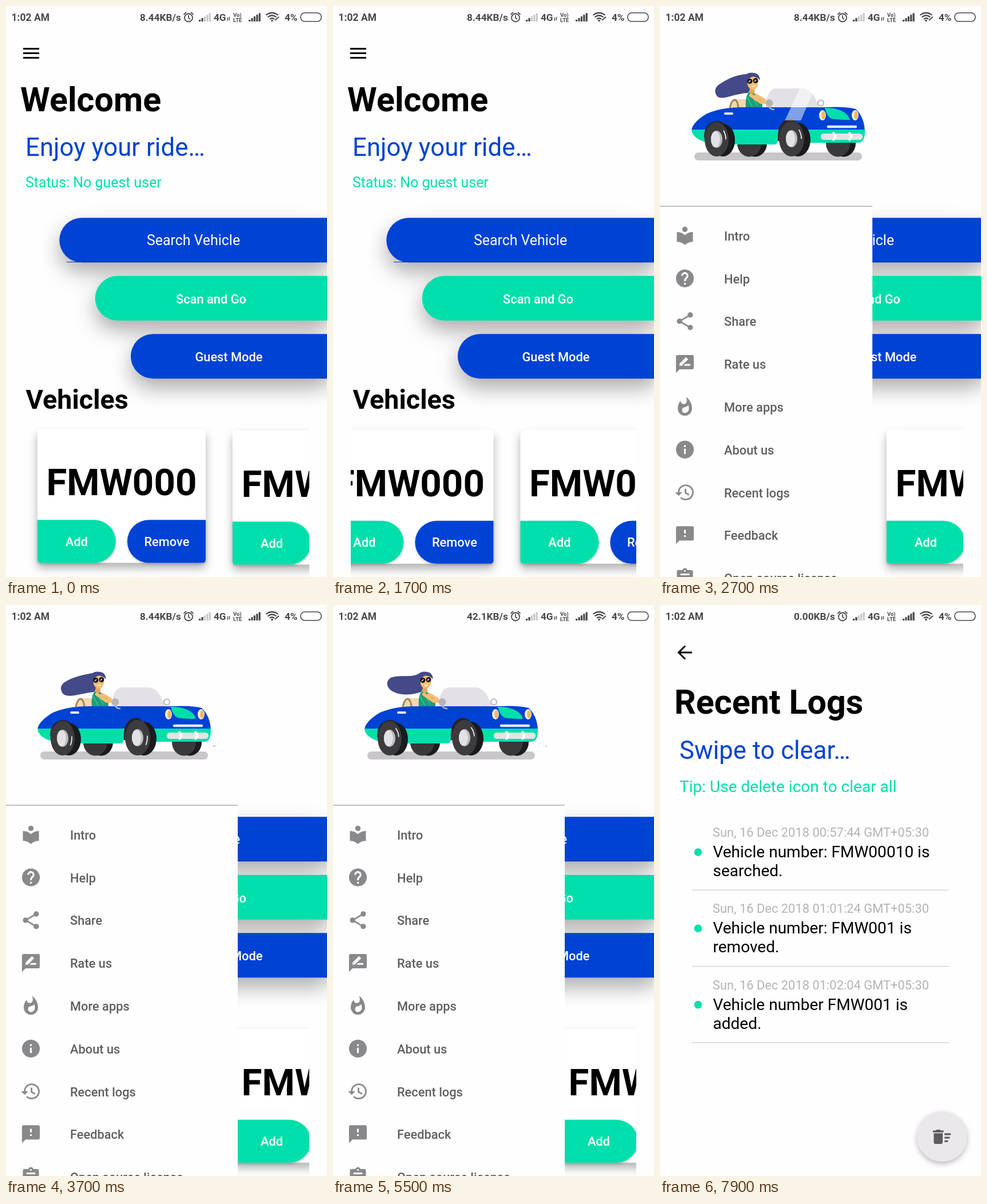
Write an HTML page that moves like this. It is 561 px wide and 998 px high and loops after 8000 ms.

```html
<!DOCTYPE html>
<html lang="en">
<head>
<meta charset="utf-8">
<title>Ride app</title>
<style>
html, body { margin: 0; width: 100%; height: 100%; overflow: hidden; background: #fefefe; }
svg { display: block; width: 100vw; height: 100vh; font-family: Roboto, sans-serif; }
text { white-space: pre; }
.card { filter: drop-shadow(0 9px 8px rgba(0,0,0,.3)); }
.chip { filter: drop-shadow(0 2px 2px rgba(0,0,0,.2)); }
.fab { filter: drop-shadow(0 4px 5px rgba(0,0,0,.26)); }
</style>
</head>
<body>
<svg id="stage" viewBox="0 0 561 998"></svg>
<script>
const BLUE = '#0042d4', GREEN = '#00dfab', GREY = '#89888b', PAPER = '#fefefe';
const LOOP = 8000;

const text = (x, y, size, str, fill = '#000', weight = 400, anchor = 'start', id = '') =>
  `<text x="${x}" y="${y}" font-size="${size}" fill="${fill}" font-weight="${weight}" text-anchor="${anchor}" id="${id}">${str}</text>`;
const path = (d, fill, extra = '') => `<path d="${d}" fill="${fill}" ${extra}/>`;
const line = (d, stroke, width, extra = '') =>
  `<path d="${d}" fill="none" stroke="${stroke}" stroke-width="${width}" ${extra}/>`;
const oval = (x, y, rx, ry, fill, extra = '') =>
  `<ellipse cx="${x}" cy="${y}" rx="${rx}" ry="${ry}" fill="${fill}" ${extra}/>`;
const disc = (x, y, r, fill, extra = '') => oval(x, y, r, r, fill, extra);
const box = (x, y, w, h, r, fill, extra = '') =>
  `<rect x="${x}" y="${y}" width="${w}" height="${h}" rx="${r}" fill="${fill}" ${extra}/>`;
// 24-unit icon centred on a point
const icon = (x, y, body) =>
  `<g transform="translate(${x} ${y}) scale(1.558) translate(-12 -12)">${body}</g>`;

function statusBar() {
  const ink = '#48484a';
  const bars = (x, solid) => [0, 1, 2, 3, 4].map(i =>
    box(x + i * 4.4, 24 - i * 2.9, 3.2, 3 + i * 2.9, 0, i < solid ? ink : '#c9c9cb')).join('');
  return text(9.5, 26, 17.5, '1:02 AM', ink, 700) +
    text(234, 26, 17.2, '', ink, 700, 'start', 'speed') +
    disc(319, 20.5, 7, 'none', `stroke="${ink}" stroke-width="1.8"`) +
    line('M319 16v5l3 2M310.5 15l4.5-4M327.5 15l-4.5-4', ink, 1.7) +
    bars(337, 2) + text(363, 26, 17.2, '4G', ink, 700) +
    line('M387.5 20v6M390.5 19v6', ink, 1.4) +
    text(397, 18.5, 9.5, 'Vo)', ink, 700) + text(397, 27.5, 9.5, 'LTE', ink, 700) +
    bars(424, 5) +
    line('M454.5 16Q465 8 475.5 16M457.5 19.5Q465 13.5 472.5 19.5M461 23Q465 19.5 469 23', ink, 2.2) +
    disc(465, 25.5, 1.8, ink) + line('M470 25l7-6', ink, 2) +
    text(487, 26, 17.2, '4%', ink, 700) +
    box(515, 12, 36, 15, 7, 'none', `stroke="${ink}" stroke-width="1.6"`);
}

function pills() {
  const rows = [[93.3, 370.3, BLUE], [155.7, 471.8, GREEN], [218, 573.2, BLUE]];
  const shadow = rows.map(([x, y]) => box(x, y + 17, 575 - x, 78, 39, '#000', 'opacity=".32"'));
  const face = rows.map(([x, y, c]) => box(x, y, 640 - x, 78, 39, c));
  return `<g filter="url(#soft)">${shadow.join('')}</g>` + face.join('') +
    line('M106 447.5H549', '#15328a', 1) +
    text(327.5, 417.6, 24.9, 'Search Vehicle', '#fff', 400, 'middle') +
    text(358.5, 519.5, 21.8, 'Scan and Go', '#fff', 500, 'middle') +
    text(389.5, 621, 21.8, 'Guest Mode', '#fff', 500, 'middle');
}

const card = (id, plate) => `<g id="${id}"><g class="card">${box(0, 0, 294, 234.4, 6, '#fff')}</g>
  ${path('M0 159.4H99.5A37.5 37.5 0 0 1 99.5 234.4H6Q0 234.4 0 228.4z', GREEN, 'class="chip"')}
  ${path('M294 159.4H194.5A37.5 37.5 0 0 0 194.5 234.4H288Q294 234.4 294 228.4z', BLUE, 'class="chip"')}
  ${text(147, 116.4, 65.4, plate, '#000', 700, 'middle')}
  ${text(68.5, 204.9, 21.8, 'Add', '#fff', 500, 'middle')}
  ${text(226, 204.9, 21.8, 'Remove', '#fff', 500, 'middle')}</g>`;

const home = () => line('M30 74.8h28M30 82.6h28M30 90.4h28', '#000', 3) +
  text(25, 183.5, 59.2, 'Welcome', '#000', 700) +
  text(34, 262, 43.8, 'Enjoy your ride…', BLUE) +
  text(34, 317, 24.9, 'Status: No guest user', GREEN) + pills() +
  text(34.5, 704, 46.7, 'Vehicles', '#000', 700) +
  `<g clip-path="url(#rail)">${card('card0', 'FMW000')}${card('card1', 'FMW001')}</g>`;

function car() {
  const wheel = (x, y, rx, ry) => oval(x + 11, y + 1.5, rx, ry - 1.5, '#1b1a1c') +
    oval(x, y, rx, ry, '#3c3b3e') + oval(x, y, 10, 15, '#bcbabd') + oval(x - 2, y, 8, 14, '#e3e1e5') +
    `<ellipse class="spin" cx="${x}" cy="${y}" rx="${rx - 5}" ry="${ry - 7}" fill="none" stroke="#fff" stroke-width="1.6" pathLength="100" stroke-dasharray="13 87"/>`;
  const farWheel = x => oval(x + 5, 240, 21, 23.5, '#1b1a1c') + oval(x - 5, 240, 21, 23.5, '#39383b');
  const lamp = x => oval(x, 191, 6, 9, '#f4f1f1') + oval(x + 1.5, 191, 3.5, 7, '#f6b95f');
  return box(60, 256, 293, 14, 7, '#c8c6c9') + farWheel(161) + farWheel(316) +
    // seat, driver
    path('M121 178Q123 163 131 163H150Q160 166 162 178z', '#f1d9ae') +
    line('M122 178Q125 164 131 164Q136 166 137 178', '#a5835b', 3) +
    path('', '#434a87', 'id="hair"') +
    path('M150 178Q148 157 157 149L170 155Q180 163 179 178z', '#1d9c78') +
    line('M153 160l8 16M160 156l10 18M167 156l8 14', '#2ccfa0', 1.5) +
    path('M157 143h8v9q-5 3-9-1z', '#eda656') + oval(162, 134, 9.5, 12, '#fbbd72') +
    path('M150 131Q152 117 165 117Q175 119 174.5 130Q168 122 160 124Q152 127 153 141z', '#434a87') +
    disc(157, 131.5, 4.5, '#151515') + disc(167, 130.5, 4.5, '#151515') +
    line('M155 133l3-3M165 132l3-3', '#fff', 1.4) + line('M160 140q3 2 6-1', '#fff', 1.6) +
    line('M159 156L176 168L187 168', '#fbbd72', 6, 'stroke-linejoin="round" stroke-linecap="round"') +
    line('M168 156l14 8', '#fbbd72', 5, 'stroke-linecap="round"') +
    path('M184 178Q187 144 203 144H250Q268 146 278 178z', '#e3e1e5') +
    disc(281, 169.5, 5, 'none', 'stroke="#c3c1c5" stroke-width="2.5"') +
    // bodywork
    path('M55 217Q57 203 82 188Q108 177 144 177H287Q325 175 342 180Q357 194 358 219z', BLUE) +
    path('M55 216H358Q359 239 346 239H262Q249 239 245 230L206 236Q205 242 199 242H104L77 237Q56 230 55 216z', GREEN) +
    path('M288 178Q325 178 332 199Q313 199 300 197Q292 194 288 178z', GREEN) +
    lamp(284) + lamp(341) + line('M294 211H342', '#e3e8f2', 4.5, 'stroke-linecap="round"') +
    box(281, 223, 73, 11, 5, '#e5e3e7') +
    line('M302 221q8 7 0 14M330 221q8 7 0 14', '#fff', 4) +
    line('M114 188H126', '#f2f2f6', 4, 'stroke-linecap="round"') +
    path('M77 228Q78 203 100 201Q123 203 126 240H80z', '#252427') +
    path('M206 236Q204 199 228 197Q246 200 248 236z', '#252427') +
    wheel(99, 233, 21, 30) + wheel(230, 232, 22, 31) +
    disc(191, 169.5, 6.5, '#b5b3b7') + line('M191 174q0 7 9 7', '#b5b3b7', 2.5) +
    `<g clip-path="url(#glass)">${path('M22 144H48L24 200H-4z', '#fff', 'opacity=".5" id="shine"')}</g>` +
    path('M362 246h4v1h-4z', GREY, 'id="dash"') + path('M372 246h1.5v1.5h-1.5z', GREY, 'id="dot"');
}

const bubble = path('M4 2H20Q22 2 22 4V16Q22 18 20 18H6L2 22V4Q2 2 4 2z', GREY);
const ball = disc(12, 12, 10, GREY);
const menu = [
  ['Intro', disc(12, 5, 3, GREY) + path('M3 8Q8 8 12 11.5Q16 8 21 8V19Q16 19 12 22.5Q8 19 3 19z', GREY)],
  ['Help', ball + line('M9 9A3 3 0 1 1 14 11.2Q12 12.7 12 15.2', PAPER, 2) + box(11, 17, 2, 2, 0, PAPER)],
  ['Share', line('M18 5L6 12L18 19', GREY, 1.7) + disc(18, 5, 3, GREY) + disc(6, 12, 3, GREY) + disc(18, 19, 3, GREY)],
  ['Rate us', bubble + path('M6 14V11.5L13.2 4.3L15.7 6.8L8.5 14zM10.5 14L12.5 12H18V14z', PAPER)],
  ['More apps', path('M13.5 .7Q14.2 3.3 14.2 5.5A3.5 3.5 0 0 1 7.2 5.5V5.1A14 14 0 0 0 4 14A8 8 0 0 0 20 14Q20 6 13.5 .7z', GREY) +
    path('M11.7 19A3.2 3.2 0 0 1 11.3 12.7Q14.5 12 15.9 10.2Q16.5 12 16.5 14.2A4.8 4.8 0 0 1 11.7 19z', PAPER)],
  ['About us', ball + path('M11 7h2v2h-2zM11 11h2v6h-2z', PAPER)],
  ['Recent logs', line('M5 12A8 8 0 1 1 7.35 17.65M12.7 8V12.5L16.7 14.9', GREY, 1.8) + path('M1 12H9L5 16z', GREY)],
  ['Feedback', bubble + path('M11 6h2v4h-2zM11 12h2v2h-2z', PAPER)],
  ['Open source license', box(3, 3, 18, 18, 2, GREY) + disc(12, 4, 3, GREY) + disc(12, 4, 1, PAPER) + path('M7 7h10v2h-10z', PAPER)]
];

const drawer = () => box(0, 0, 405, 998, 0, PAPER) + car() + line('M0 350H405', '#858585', 1.2) +
  menu.map(([label, art], i) => icon(43.5, 401.3 + 74.8 * i, art) +
    text(112, 409.7 + 74.8 * i, 21.8, label, '#5f5f61', 500)).join('');

function logs() {
  const entries = [
    ['00:57:44', 'Vehicle number: FMW00010 is', 'searched.'],
    ['01:01:24', 'Vehicle number: FMW001 is', 'removed.'],
    ['01:02:04', 'Vehicle number FMW001 is', 'added.']
  ];
  return box(0, 0, 561, 998, 0, PAPER) + line('M56 83H33M44 71.5L32.5 83L44 94.5', '#000', 3) +
    text(25, 190, 59.2, 'Recent Logs', '#000', 700) +
    text(34, 269, 43.6, 'Swipe to clear…', BLUE) +
    text(34, 327, 28.04, 'Tip: Use delete icon to clear all', GREEN) +
    entries.map(([time, first, second], i) => `<g transform="translate(0 ${133.3 * i})">` +
      text(92, 405, 21.9, `Sun, 16 Dec 2018 ${time} GMT+05:30`, '#b4b4b4') +
      text(92.5, 441, 28.04, first) + text(92.5, 474, 28.04, second) +
      disc(66.5, 432, 6.8, GREEN) + line('M56 498.3H505', '#dcdcdc', 1.8) + '</g>').join('') +
    disc(493, 929, 44, '#ebe8eb', 'class="fab"') +
    icon(492.5, 929.5, path('M15 16h4v2h-4zM15 8h7v2h-7zM15 12h6v2h-6zM3 8H13V18Q13 20 11 20H5Q3 20 3 18zM14 5H11L10 4H6L5 5H2V7H14z', '#5c5b5e'));
}

const $ = id => document.getElementById(id);
$('stage').innerHTML = `<defs>
  <filter id="soft" x="-20%" y="-30%" width="140%" height="160%"><feGaussianBlur stdDeviation="18"/></filter>
  <clipPath id="rail">${box(31, 735, 499, 263, 0, '#000')}</clipPath>
  <clipPath id="reveal"><rect id="edge" y="40" height="958"/></clipPath>
  <clipPath id="glass">${path('M184 178Q187 144 203 144H250Q268 146 278 178V200H184z', '#000')}</clipPath>
</defs>
<g id="home">${home()}<g clip-path="url(#reveal)"><g id="drawer">${drawer()}</g></g></g>
<g id="logs">${logs()}</g>${statusBar()}`;

const clamp = v => Math.min(1, Math.max(0, v));
const easeOut = v => 1 - (1 - clamp(v)) ** 3;
const show = (id, on) => $(id).setAttribute('display', on ? 'inline' : 'none');
const move = (id, x, y = 0) => $(id).setAttribute('transform', `translate(${x} ${y})`);

function drawCar(t) {
  const run = Math.min(t, 4500);
  const k = (1 - Math.cos((run - 2700) / 1200 * 2 * Math.PI)) / 2;
  const mix = (a, b) => a + (b - a) * k;
  $('hair').setAttribute('d', `M172 122Q162 113 151 119C${mix(138, 140)} ${mix(120, 128)} ${mix(122, 118)} ${mix(124, 121)} ${mix(102, 101)} ${mix(138, 127)}` +
    `Q${mix(92, 90)} ${mix(147, 135)} ${mix(100, 98)} ${mix(158, 146)}C${mix(110, 108)} ${mix(166, 157)} ${mix(128, 130)} ${mix(153, 160)} 154 152z`);
  document.querySelectorAll('.spin').forEach(el => el.setAttribute('stroke-dashoffset', 15 - (run - 4500) * .11));
  const sweep = ((t + 100) % 800 - 400) / 400;
  show('shine', Math.abs(sweep) < .5);
  move('shine', 222 + sweep * 110);
  show('dash', t >= 3600 && t < 4500);
  show('dot', t >= 4500);
}

function draw(t) {
  const slide = t < 1800 ? -t * .0403 : -72.5 * (1 - easeOut((t - 1800) / 300));
  const settle = 1.5 * (1 - clamp(t / 300));
  move('card0', 55 + slide, 740.4 - settle);
  move('card1', 396 + slide, 740.4 + settle);

  const open = easeOut((t - 2200) / 450);
  move('drawer', -405 * (1 - open));
  $('edge').setAttribute('width', Math.max(0, 405 * open - 34 * (1 - clamp((t - 2700) / 200))));
  drawCar(t);

  show('home', t < 6200);
  show('logs', t >= 6200);
  $('speed').textContent = (t < 4100 ? '8.44' : t < 7800 ? '42.1' : '0.00') + 'KB/s';
}

const start = performance.now();
function tick() {
  draw((performance.now() - start) % LOOP);
  requestAnimationFrame(tick);
}
tick();
</script>
</body>
</html>
```
